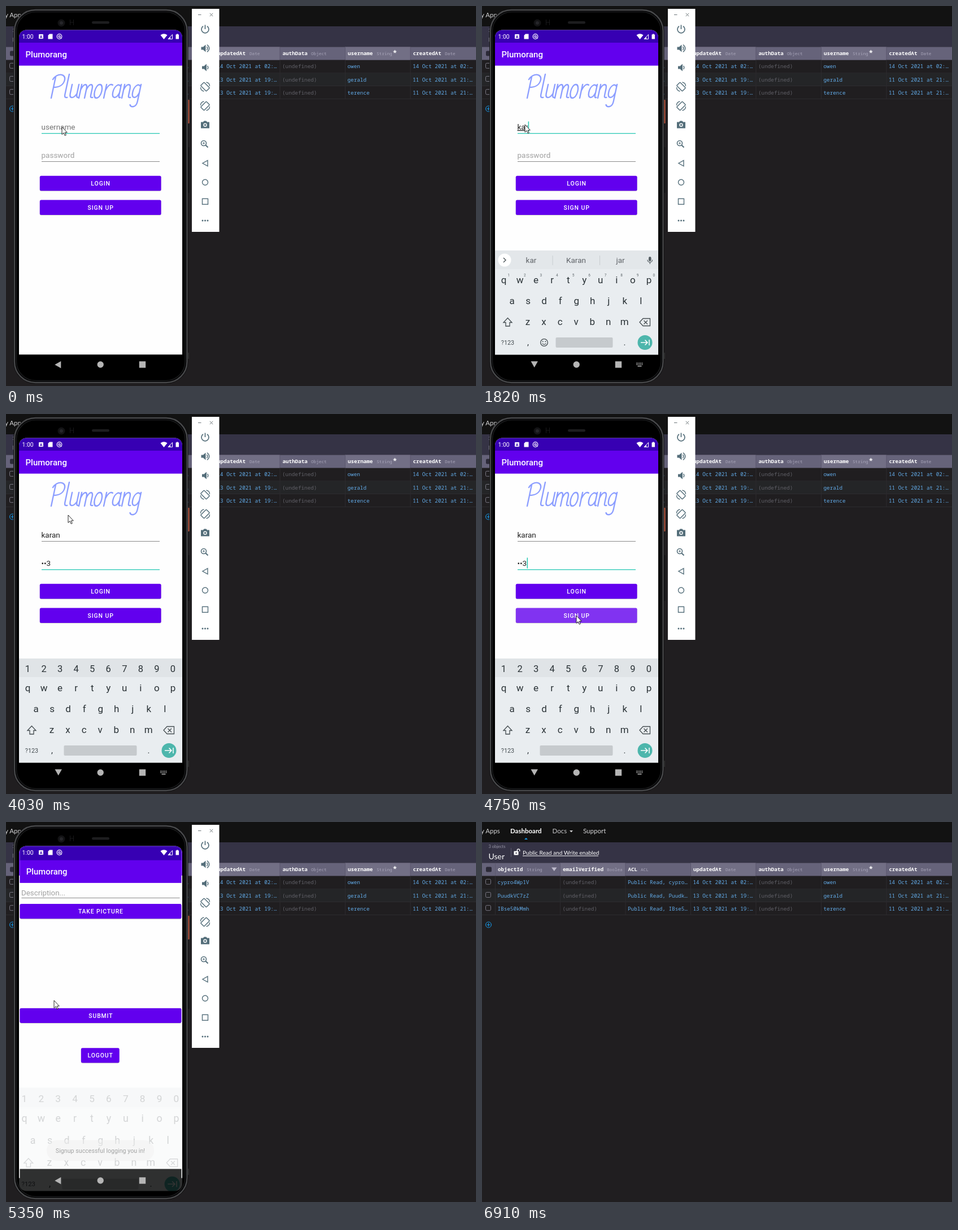
These frames come from a looping animation (832 by 673 pixels, 8000 ms). An HTML page:

```html
<!DOCTYPE html>
<html lang="en">
<head>
<meta charset="utf-8">
<title>Sign-up demo</title>
<style>
html, body { margin: 0; width: 100%; height: 100%; overflow: hidden; background: #201e20; }
svg { display: block; width: 832px; height: 673px; }
text { white-space: pre; }
.ui { font-family: Roboto, sans-serif; }
.lato { font-family: Lato, sans-serif; }
.mono { font-family: "Noto Sans Mono", monospace; }
</style>
</head>
<body>
<svg id="stage" viewBox="0 0 832 673" xmlns="http://www.w3.org/2000/svg"></svg>
<script>
const LOOP = 8000, APP = 'Plumorang';
const VIOLET = '#6200ee', TEAL = '#2cc9b5', SLATE = '#546e7a';

// ---- markup helpers
const rect = (x, y, w, h, fill, more = '') =>
  `<rect x="${x}" y="${y}" width="${w}" height="${h}" fill="${fill}" ${more}/>`;
const circle = (x, y, r, fill, more = '') => `<circle cx="${x}" cy="${y}" r="${r}" fill="${fill}" ${more}/>`;
const fillPath = (d, fill, more = '') => `<path d="${d}" fill="${fill}" ${more}/>`;
const line = (d, color, w = 1, more = '') =>
  `<path d="${d}" fill="none" stroke="${color}" stroke-width="${w}" ${more}/>`;
const text = (x, y, size, fill, str, more = '') =>
  `<text x="${x}" y="${y}" font-size="${size}" fill="${fill}" ${more}>${str}</text>`;
const mid = (x, y, size, fill, str, more = '') => text(x, y, size, fill, str, 'text-anchor="middle" ' + more);
const group = (id, body, more = '') => `<g id="${id}" ${more}>${body}</g>`;
const button = (x, y, w, label, id = '') =>
  rect(x, y + .8, w, 26.5, '#000', 'rx="2.5" opacity=".22"') +
  rect(x, y, w, 26.5, VIOLET, `rx="2.5" id="${id}"`) +
  mid(x + w / 2 + .4, y + 17.2, 10.5, '#fff', label, 'font-weight="500" letter-spacing=".9"');

// ---- dashboard behind the phone
function dashboard() {
  const cols = [
    [23, 'objectId', 79, 'String'], [138, 'emailVerified', 221, 'Boolea'], [253.5, 'ACL', 281, 'ACL'],
    [369, 'updatedAt', 431, 'Date'], [484.5, 'authData', 540, 'Object'],
    [600, 'username', 656, 'String'], [715.5, 'createdAt', 777, 'Date']
  ];
  const rows = [['cypro4Wp1V', 'owen', '14', '02', '14', '02'],
    ['PuudkVC7zZ', 'gerald', '13', '19', '11', '21'],
    ['IBse50kMmh', 'terence', '13', '19', '11', '21']];
  let s = rect(0, 0, 832, 673, '#201e20') + rect(0, 0, 832, 36, '#121212') + rect(0, 36, 832, 36.5, '#353345');
  s += '<g class="lato">' +
    text(-2, 20, 11.5, '#d4d4d6', 'y Apps') + text(50, 20, 11.5, '#fff', 'Dashboard', 'font-weight="700"') +
    text(124.5, 20, 11.5, '#c8c8ca', 'Docs') + text(179, 20, 11.5, '#d4d4d6', 'Support') +
    fillPath('M155 15h6l-3 3.2z', '#d4d4d6') + fillPath('M75 31l3-3 3 3z', '#169cee') +
    text(11.5, 46, 7.5, '#9a98a8', '3 objects') + text(11.5, 66, 14, '#fff', 'User') +
    rect(51, 46, 1, 16, '#5a586c') +
    rect(56.5, 51.5, 8, 7, '#fff', 'rx="1"') + circle(60.5, 55, 1.2, '#353345') +
    line('M62.3 52v-2a2.2 2.2 0 0 1 4.4 0v2', '#fff', 1.3) +
    text(72, 58, 10.1, '#fff', 'Public Read and Write enabled') + rect(72, 59.5, 134, 1, '#fff') + '</g>';
  s += '<g class="mono">' + rect(0, 72.5, 832, 23, '#66637a');
  for (let i = 0; i < 3; i++) {
    const y = 95.5 + i * 23;
    if (i == 1) s += rect(0, y, 832, 23, '#242527');
    s += rect(0, y + 22.5, 832, 1, '#2c2b2f');
  }
  cols.forEach(([x, name, tx, type], i) => {
    if (i % 2) s += rect(x, 72.5, 115.5, 23, '#726f85');
    s += rect(x, 72.5, 1, 23, '#5c596f') + rect(x, 95.5, 1, 69, '#2c2b2f') +
      text(x + 5, 87, 9.25, '#fff', name, 'font-weight="700"') +
      text(tx, 86.5, 7.7, '#a9a6ba', type, 'font-weight="500"');
  });
  s += fillPath('M123 80.5h9.5l-4.75 6.5z', '#bdbacb') + mid(688.5, 88, 13, '#fff', '*', 'font-weight="700"');
  s += rect(7, 79.5, 10, 9, '#2c2a38', 'rx="2"');
  rows.forEach(([id, user, d1, h1, d2, h2], i) => {
    const y = 110.3 + i * 23.2;
    const vals = [id, '(undefined)', `Public Read, ${id.slice(0, 5)}…`, `${d1} Oct 2021 at ${h1}:…`,
      '(undefined)', user, `${d2} Oct 2021 at ${h2}:…`];
    s += rect(6.5, y - 9, 9, 9, 'none', 'rx="2" stroke="#7b7985"');
    vals.forEach((v, c) => {
      s += text(cols[c][0] + 4.5, y, 9.3, v[0] == '(' ? '#606067' : '#62abe8', v);
    });
  });
  s += circle(11.5, 182, 5, 'none', 'stroke="#169cee"') + line('M8.5 182h6M11.5 179v6', '#169cee');
  return s + '</g>';
}

// ---- phone shell
function shell() {
  return rect(321, 166, 3.5, 42, '#c25a41', 'rx="1"') + rect(321, 250, 4, 81, '#161618', 'rx="1"') +
    rect(322, 614, 1.5, 11, '#444') +
    rect(13, 5, 309.5, 664, '#0a0a0b', 'rx="39"') +
    rect(15, 7, 305.5, 660, '#050506', 'rx="37" stroke="#48494b" stroke-width="2.4"') +
    rect(18.5, 10.5, 298.5, 653, '#000', 'rx="34" stroke="#1a1b1c" stroke-width="1.5"') +
    circle(98, 30, 6.5, '#131315') + circle(98, 30, 3, '#26262a') +
    line('M113.5 24v10M119.5 24v10M113.5 29h6', '#19191b') +
    rect(152, 27, 31, 4.5, '#1d1d1f', 'rx="2.2"');
}

// an app window: content area, app bars and the black strip under the navigation icons
const page = body => rect(23, 42, 289, 576, '#fefefe') + rect(23, 42, 289, 23.5, '#3700b3') +
  rect(23, 65, 289, 40.6, VIOLET) + text(34.5, 91, 15, '#fff', APP, 'font-weight="500"') +
  body + rect(23, 617.3, 289, 40, '#000');

const statusIcons = () => text(28.5, 57.8, 10.5, '#fff', '1:00') +
  rect(58, 50, 8, 8, '#fff', 'rx="1"') + mid(62, 56.7, 7, '#3700b3', 'A', 'font-weight="700"') +
  fillPath('M77 49.5h5.5v9h-8v-6.5z', '#fff') +
  circle(94.5, 54, 4.3, 'none', 'stroke="#fff" stroke-width="1.2"') +
  circle(94.5, 54, 1.8, 'none', 'stroke="#fff" stroke-width="1.1"') + line('M94.5 54l4 4', '#fff') +
  fillPath('M273.5 51.5Q279.5 47 285.5 51.5L279.5 59z', '#fff') +
  line('M287 58.5h7.5v-8z', '#fff', 1) + fillPath('M287 58.5l4-4v4z', '#fff') +
  fillPath('M300.5 50.5h1.5v-1h2.5v1h1.5v8h-5.5z', '#fff');

// monoline lettering: [advance, strokes]
const GLYPHS = {
  P: [24, 'M3 0V-38M-1-33C3-45 21-44 20-31C19-21 10-19 3-19'],
  l: [10, 'M2-42V-6Q2 0 7-1'],
  u: [17, 'M1-24V-8C1 2 9 1 13-8V-24M13-8Q13 0 17-1'],
  m: [26, 'M1 0V-24M1-14C4-26 11-27 11-17V0M11-14C14-26 21-27 21-17V-5Q21 0 25-1'],
  o: [18, 'M7-24C-1-24-2 0 6 0C15 0 15-24 7-24Z'],
  r: [15, 'M1 0V-24M1-13C4-22 7-26 12-23'],
  a: [17, 'M12-20C8-27 0-22 0-10C0 2 9 2 12-10V-24M12-10V-5Q12 0 15-1'],
  n: [18, 'M1 0V-24M1-14C4-26 12-27 12-17V-5Q12 0 16-1'],
  g: [16, 'M12-20C8-27 0-22 0-10C0 2 9 2 12-10M12-24V6C12 17 3 17 0 12']
};
function lettering() {
  let x = 0, s = '';
  for (const ch of APP) {
    const [adv, d] = GLYPHS[ch];
    s += `<path d="${d}" transform="translate(${x})"/>`;
    x += adv;
  }
  return `<g role="img" aria-label="${APP}" transform="translate(77 163) skewX(-12)" fill="none" stroke="#8c9eff"
    stroke-width="2.4" stroke-linecap="round" stroke-linejoin="round">${s}</g>`;
}

const login = () => page(lettering() +
  text(62.5, 218.8, 13.5, '#757575', 'username', 'id="userHint"') + text(62.5, 218.8, 13.5, '#212121', '', 'id="user"') +
  text(62.5, 268.8, 13.5, '#a0a0a0', 'password', 'id="passHint"') + text(62.5, 268.8, 13.5, '#212121', '', 'id="pass"') +
  rect(63, 225, 209, 1, TEAL, 'id="userLine"') + rect(63, 275, 209, 1, '#8a8a8a', 'id="passLine"') +
  rect(0, 204, 1.6, 19, TEAL, 'id="caret"') +
  button(59.8, 300.8, 214.8, 'LOGIN') + button(59.8, 343.5, 214.8, 'SIGN UP', 'signup'));

const post = () => page(
  text(25.5, 127.5, 13.5, '#a0a0a0', 'Description...') + rect(26, 132, 283, 1, '#8a8a8a') +
  button(23, 143.2, 289, 'TAKE PICTURE') + button(23, 329.7, 289, 'SUBMIT') + button(132.5, 401, 68.5, 'LOGOUT'));

// ---- keyboard
function keyboard() {
  const INK = '#2a3236', step = 28.55;
  const row = (keys, x, y, size = 17) =>
    [...keys].map((k, i) => mid(x + i * step, y, size, INK, k)).join('');
  const space = x => rect(x, 587, 231.5 - x, 18, '#c6cacd', 'rx="2"');
  const words = rect(23, 433, 289, 33, '#e3e7ea') + circle(40, 450, 11.5, '#fff') +
    line('M38 446l4 4-4 4', '#4a5256', 1.4, 'id="chevron"') +
    rect(295, 444, 4.5, 8, '#555e63', 'rx="2.2"') + line('M293 449.5a4.3 4.3 0 0 0 8.6 0M297.3 454v3', '#555e63', 1.2) +
    group('tools', line('M75 445h8v6l-3 3.5h-5zM83 451h-3v3.5', '#5f6368', 1.2) +
      mid(124, 454, 10, '#5f6368', 'GIF', 'font-weight="700"') +
      circle(167, 450, 3.8, 'none', 'stroke="#5f6368" stroke-width="2.4" stroke-dasharray="2 1"') +
      [246, 251, 256].map(x => circle(x, 450, 1.4, '#5f6368')).join('')) +
    group('suggest', [87, 166.5, 245].map((x, i) => mid(x, 455, 13.5, '#5f6368', '', `id="word${i}"`)).join('') +
      rect(124.5, 442, 1, 17, '#c8cdd0') + rect(208, 442, 1, 17, '#c8cdd0')) +
    [...'1234567890'].map((d, i) => mid(47.3 + i * step, 478.5, 6.5, '#5f686c', d)).join('') + space(130.5) +
    circle(110, 596, 6.3, 'none', 'stroke="#454d51" stroke-width="1.3"') +
    circle(107.7, 594.3, 1, '#454d51') + circle(112.3, 594.3, 1, '#454d51') + line('M106.8 597.5q3.2 4 6.4 0', '#454d51', 1.2);
  const nums = rect(23, 433, 289, 33, '#e0e4e7') + row('1234567890', 38.5, 457, 16.5) + space(102.5);
  return rect(23, 433, 289, 184.5, '#e9edf0') + group('words', words) + group('nums', nums) +
    row('qwertyuiop', 38.5, 490.7) + row('asdfghjkl', 53, 527.7) + row('zxcvbnm', 81, 565.2) +
    line('M45.5 552.5l7.5 8h-4v6.5h-7v-6.5h-4z', '#454d51', 1.3) +
    line('M285 553.5h12.5v13H285l-6-6.5zM286.5 557l6.5 6.5M293 557l-6.5 6.5', '#454d51', 1.3) +
    mid(45.5, 600, 10.8, '#454d51', '?123') + mid(81.5, 601, 15, INK, ',') + mid(252.5, 601, 15, INK, '.') +
    circle(288.5, 596, 13, '#4db6ac') + line('M281 596h11.5M288.5 591.5l4.5 4.5-4.5 4.5M296 591v10', '#fff', 1.5);
}

const navIcons = () => fillPath('', '#b5b5b5', 'id="back"') + circle(167.2, 635, 5.7, '#b5b5b5') +
  rect(235.8, 629.3, 11.4, 11.4, '#b5b5b5') +
  group('kbIcon', line('M273 632.5h12M273 635h12', '#b5b5b5', 1.5, 'stroke-dasharray="1.5 1"') +
    rect(275.5, 637, 7, 1.5, '#b5b5b5'));

const toast = () => rect(72, 563.5, 190, 36.5, '#efefef', 'rx="18"') +
  mid(167, 585.8, 10.7, '#3a3a3a', 'Signup successful logging you in!');

function sidebar() {
  const st = (d, w = 1.5) => line(d, SLATE, w);
  const rotate = (y, flip) => `<g transform="translate(352.5 ${y}) scale(${flip} 1)">` +
    `<rect x="-4.2" y="-7" width="8.4" height="14" rx="1" transform="rotate(45)" fill="none" stroke="${SLATE}" stroke-width="1.5"/>` +
    st('M-8-1Q-8-7-2-8M8 1Q8 7 2 8', 1.3) + '</g>';
  const speaker = (x, y) => fillPath(`M${x} ${y - 2.5}h3.5l4.5-4v13l-4.5-4h-3.5z`, SLATE);
  return rect(329, 5, 48.5, 395, '#fff') + rect(329, 64, 48.5, 336, '#f0f0f0', 'id="dim"') +
    line('M340 15.5h5.5M360.8 12.8l5.4 5.4M366.2 12.8l-5.4 5.4', '#6b7478') +
    st('M349 35.8a6.5 6.5 0 1 0 7 0M352.5 33.5v7.5', 1.7) +
    speaker(345.5, 75) + st('M355.5 72q2.5 3 0 6M356 68.5q7.5 6.5 0 13') +
    speaker(347, 109) + st('M356.5 106q2.5 3 0 6') + rotate(143, -1) + rotate(177, 1) +
    fillPath('M345 205.5h4l1.5-2h4l1.5 2h4v11h-15z', SLATE) + circle(352.5, 210.8, 3.2, '#fff') + circle(352.5, 210.8, 1.8, SLATE) +
    st('M353.5 246.5l4 4', 2) + circle(350, 243, 4.5, 'none', `stroke="${SLATE}" stroke-width="1.6"`) + st('M348 243h4M350 241v4', 1) +
    st('M357 273.5v10l-9-5z', 1.4) + circle(352.5, 312.3, 5, 'none', `stroke="${SLATE}" stroke-width="1.4"`) +
    rect(347.5, 341.3, 10, 10, 'none', `stroke="${SLATE}" stroke-width="1.4"`) +
    [348, 352.5, 357].map(x => circle(x, 380, 1.5, SLATE)).join('');
}

const $ = id => document.getElementById(id);
$('stage').innerHTML = '<defs><clipPath id="screen"><rect x="23" y="42.5" width="289" height="611" rx="13"/></clipPath></defs>' +
  dashboard() +
  group('device', shell() +
    '<g clip-path="url(#screen)">' + group('login', login()) + group('post', post()) +
    group('keys', keyboard()) + group('toast', toast()) +
    statusIcons() + navIcons() + '</g>' + sidebar(), 'class="ui"') +
  fillPath('M0 0V13.5L3.1 10.7L5.2 15.5L7.3 14.6L5.2 10H9.3Z', '#fff',
    'id="mouse" stroke="#111" stroke-width=".9" stroke-linejoin="round"');

// ---- timelines: [start, ...values], each held until the next
const mouse = [[0, 99, 214], [120, 94, 213], [240, 82, 211], [360, 76, 210],
  [3910, 62, 200], [4030, 110, 179], [4150, 200, 200], [4270, 257, 270], [4390, 240, 345], [4510, 195, 381], [4630, 167, 357],
  [4990, 150, 350], [5110, 118, 334], [5230, 94, 321], [5350, 85, 316], [5470, 541, 190], [5590, 641, 205],
  [5710, 600, 225], [5830, 540, 240], [5950, 490, 246], [6070, 455, 248], [6190, 441, 248], [6310, 439, 247], [6430, 485, 253]];
const user = [[0, ''], [600, 'k'], [1450, 'ka'], [1820, 'kar'], [2060, 'kara'], [2180, 'karan']];
const pass = [[0, ''], [3180, '1'], [3300, '•2'], [3540, '••3']];
const words = [[0, '', '', ''], [720, 'k', 'I', 'keep'], [1450, 'ka', 'Ka', 'la'], [1820, 'kar', 'Karan', 'jar'],
  [2060, 'kara', 'Karan', 'Kara'], [2180, 'karan', 'Karan', 'Kara']];
const caret = [[0, 0], [360, 1], [1210, 0], [1450, 1], [2930, 0], [3180, 1], [4030, 0], [4510, 1]];
const keys = [[0, 0, 0, 1], [120, .3, 120, 1], [240, .8, 45, 1], [360, 1, 0, 1],
  [5110, .8, 8, 1.01], [5230, .5, 20, 1.03], [5350, .2, 33, 1.047], [5470, 0, 0, 1]];
const enter = [[0, 0, 1], [5110, .4, .93], [5230, .9, .97], [5350, 1, .99], [5470, 1, 1]];
const note = [[0, 0], [5350, .45], [5470, .8], [5590, 1]];
const leave = [[0, 1, 1], [6670, .6, .97], [6790, .2, .94], [6910, 0, .92]];

const at = (list, t) => list.reduce((hit, k) => k[0] <= t ? k : hit).slice(1);
const set = (id, attrs) => { for (const k in attrs) $(id).setAttribute(k, attrs[k]); };
const show = (id, on) => set(id, { visibility: on ? 'inherit' : 'hidden' });
const zoom = (s, dy = 0) => `translate(167.5 ${335 + dy}) scale(${s}) translate(-167.5 -335)`;

function field(id, str, active) {
  $(id).textContent = str;
  show(id + 'Hint', !str);
  set(id + 'Line', { fill: active ? TEAL : '#8a8a8a', height: active ? 1.3 : 1 });
}

function draw(t) {
  const first = t < 2430, typed = t >= 600, open = t >= 240 && t < 5230;
  field('user', at(user, t)[0], first);
  field('pass', at(pass, t)[0], !first);
  set('user', { 'text-decoration': first ? 'underline' : 'none' });
  const len = $(first ? 'user' : 'pass').getComputedTextLength();
  set('caret', { x: 62.8 + len, y: first ? 204.5 : 254.5 });
  show('caret', at(caret, t)[0]);
  set('signup', { fill: t >= 4750 ? '#8133f1' : VIOLET });

  show('words', first);
  show('nums', !first);
  show('tools', !typed);
  show('suggest', t >= 720);
  set('chevron', { d: typed ? 'M38 446l4 4-4 4' : 'M42 446l-4 4 4 4' });
  at(words, t).forEach((w, i) => { $('word' + i).textContent = w; });

  const [ka, kdy, ks] = at(keys, t);
  set('keys', { opacity: ka, transform: zoom(ks, kdy) });
  set('login', { transform: zoom(ks) });
  const [ea, es] = at(enter, t);
  set('post', { opacity: ea, transform: zoom(es) });
  set('toast', { opacity: at(note, t)[0] });
  set('back', { d: open ? 'M86.5 629.3h12.4l-6.2 11z' : 'M97.3 629v12.4l-11-6.2z' });
  show('kbIcon', open);
  show('dim', t >= 5830);

  const [da, ds] = at(leave, t);
  set('device', { opacity: da, transform: zoom(ds) });
  const [mx, my] = at(mouse, t);
  set('mouse', { transform: `translate(${mx} ${my})` });
  show('mouse', t < 6670);
}

const start = performance.now();
function tick() {
  draw((performance.now() - start) % LOOP);
  requestAnimationFrame(tick);
}
tick();
</script>
</body>
</html>
```
